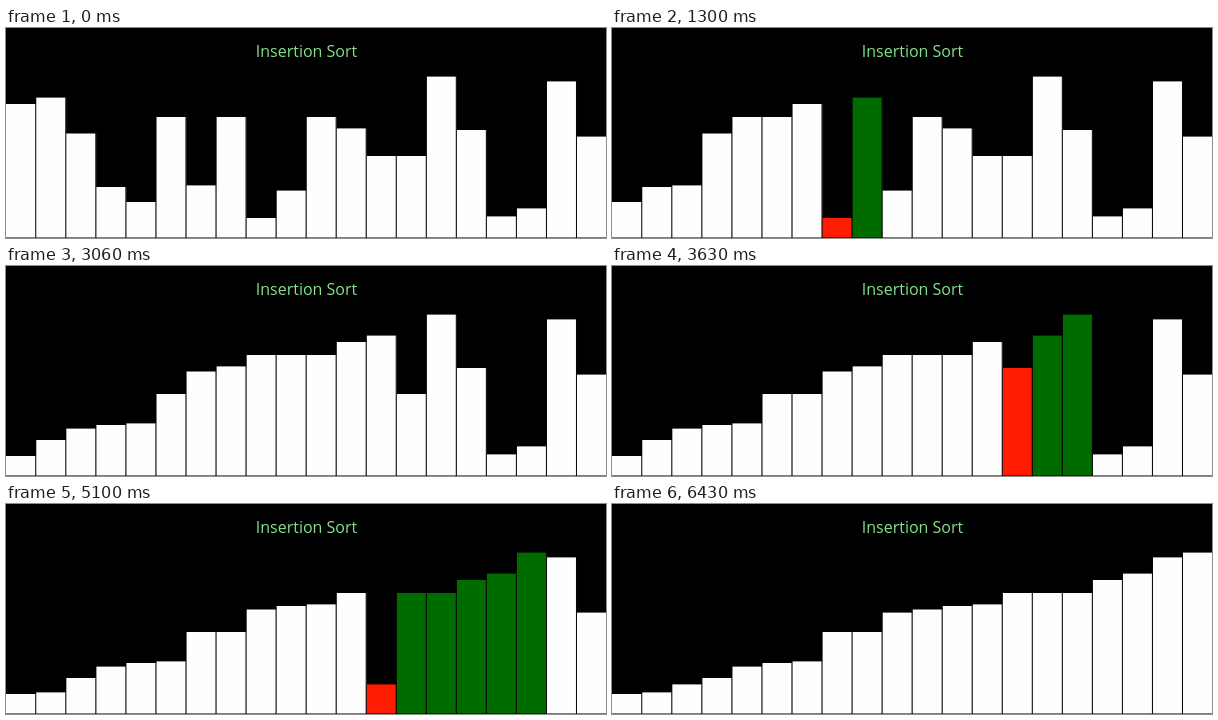
An HTML page with a canvas for the animation above (6.5 s loop, 600x210 px).

```html
<!DOCTYPE html>
<html lang="en">
<head>
<meta charset="utf-8">
<title>Insertion Sort</title>
<style>
html, body { margin: 0; width: 600px; height: 210px; overflow: hidden; background: #000; }
canvas { display: block; }
</style>
</head>
<body>
<canvas id="stage" width="600" height="210"></canvas>
<script>
const stage = document.getElementById('stage');
const ctx = stage.getContext('2d');
const layer = stage.cloneNode();
const pen = layer.getContext('2d');

const LOOP = 6500, FRAME = 100 / 3;
const STEP = 53.6, START = -79, FADE = 18;
const BAR = 30.04, FLOOR = 209.5;
const WHITE = '#fefefe', RED = '#ff1c00', GREEN = '#006c00';

// Top edge of each bar; a smaller number is a taller bar.
const tops = [76, 69.6, 105.5, 159, 174, 89, 157.4, 89, 190, 162.6,
              89, 100.4, 128, 128, 48.6, 102, 188.4, 180.4, 53.4, 108.6];

// One state per shift, plus an unmarked one after each insertion.
function sortStates(bars) {
  const a = [...bars], states = [];
  const save = (red = -1, last = -1) => states.push({ bars: [...a], red, last });
  save();
  for (let i = 1; i < a.length; i++) {
    for (let j = i; j > 0 && a[j - 1] < a[j]; j--) {
      [a[j - 1], a[j]] = [a[j], a[j - 1]];
      save(j - 1, i);
    }
    save();
  }
  return states;
}

const states = sortStates(tops);
const clamp = (v, lo, hi) => Math.min(hi, Math.max(lo, v));

// Paint a whole state on the layer first, so that it fades in as one picture.
function drawState({ bars, red, last }, alpha) {
  pen.fillStyle = '#000';
  pen.fillRect(0, 0, 600, 210);
  bars.forEach((top, i) => {
    pen.fillStyle = i === red ? RED : i > red && i <= last ? GREEN : WHITE;
    pen.fillRect(i * BAR, top, BAR, FLOOR - top);
  });
  pen.fillStyle = '#000';
  for (let i = 1; i < bars.length; i++) pen.fillRect(i * BAR - 0.8, 0, 1, 210);
  ctx.globalAlpha = alpha;
  ctx.drawImage(layer, 0, 0);
  ctx.globalAlpha = 1;
}

function drawTitle() {
  ctx.font = '16px "Open Sans", "Noto Sans", sans-serif';
  ctx.textAlign = 'center';
  ctx.fillStyle = '#84e08c';
  ctx.fillText('Insertion Sort', 300.5, 29);
}

function draw(ms) {
  // The picture advances 30 times a second, on 10 ms ticks.
  const tick = Math.floor(ms / 10) * 10 + 9.99;
  const t = Math.floor(tick / FRAME) * FRAME;
  const pos = (t - START + FADE / 2) / STEP;
  const n = clamp(Math.floor(pos), 0, states.length - 1);
  const mix = clamp((pos - n) * STEP / FADE, 0, 1);
  drawState(states[Math.max(0, n - 1)], 1);
  drawState(states[n], mix);
  drawTitle();
}

function loop() {
  draw(performance.now() % LOOP);
  requestAnimationFrame(loop);
}
loop();
</script>
</body>
</html>
```
